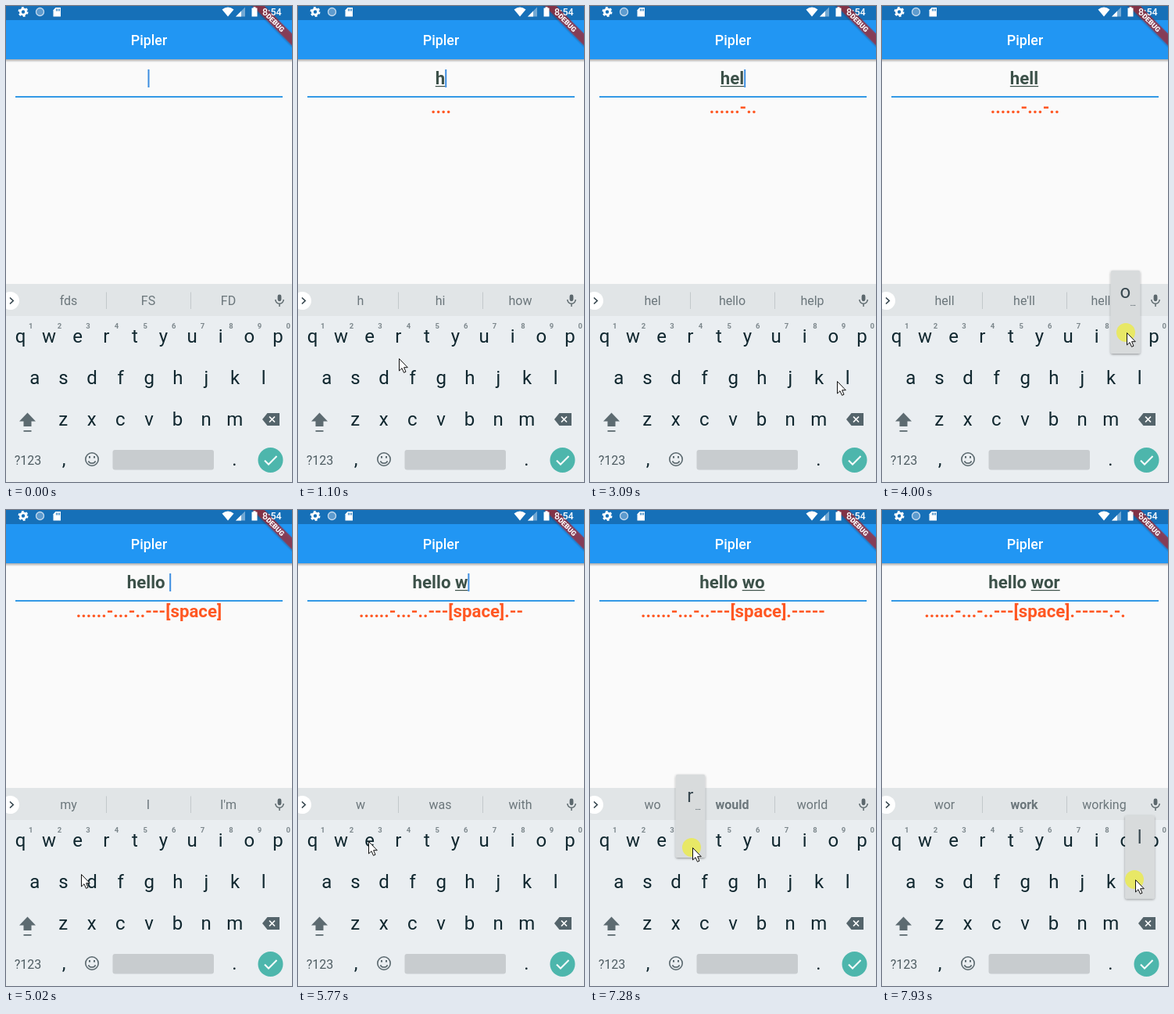
Animation of 366 by 608 pixels, one loop 8 s. Source, as an HTML page:

```html
<!DOCTYPE html>
<html lang="en">
<head>
<meta charset="utf-8">
<title>Pipler</title>
<style>
html, body { margin: 0; width: 100%; height: 100%; overflow: hidden; background: #fafafa; }
svg { display: block; width: 100%; height: 100%; font-family: Roboto, sans-serif; }
text { white-space: pre; }
.mid { text-anchor: middle; }
.big { font-size: 22.26px; font-weight: 700; }
.key { font-size: 24px; fill: #10272f; }
.hint { font-size: 9.5px; font-weight: 700; fill: #7c878c; }
.tip { font-size: 16px; fill: #6b767b; }
</style>
</head>
<body>
<svg viewBox="0 0 366 608">
  <defs>
    <linearGradient id="fade" x2="0" y2="1">
      <stop stop-color="#000" stop-opacity=".32"/><stop offset="1" stop-color="#000" stop-opacity="0"/>
    </linearGradient>
    <filter id="lift" x="-30%" y="-20%" width="160%" height="140%">
      <feDropShadow dx="0" dy="1" stdDeviation="1.5" flood-opacity=".4"/>
    </filter>
  </defs>

  <rect width="366" height="608" fill="#fafafa"/>
  <rect y="68" width="366" height="4" fill="url(#fade)"/>
  <rect y="18" width="366" height="50" fill="#2196f3"/>
  <rect width="366" height="18" fill="#1670b8"/>
  <text class="mid" x="183" y="50" font-size="17.8" font-weight="500" fill="#fff">Pipler</text>

  <g transform="translate(366) rotate(45)">
    <rect x="-60" y="24.9" width="120" height="10.7" fill="#b71c1c" fill-opacity=".63" filter="url(#lift)"/>
    <text class="mid" y="33.4" font-size="9" font-weight="900" fill="#fff">DEBUG</text>
  </g>

  <g fill="#fff">
    <circle cx="22" cy="7.5" r="3.6" fill="none" stroke="#fff" stroke-width="2.8"/>
    <circle cx="22" cy="7.5" r="5.5" fill="none" stroke="#fff" stroke-width="2" stroke-dasharray="2.88"/>
    <circle cx="43.5" cy="7.5" r="5" fill="#8fb8dc" fill-opacity=".6" stroke="#c4daee" stroke-width="1.3"/>
    <path d="M63.5 2H70V13.5H60.500V5.200Z"/>
    <path d="M64.500 3.500v3m2-3v3m2-3v3" stroke="#1670b8"/>
    <path d="M276.500 4.500Q284 -1.500 291.500 4.500L284 13.500Z"/>
    <path d="M306 1.500V13.500H294Z" fill-opacity=".4"/>
    <path d="M301 6.500V13.500H294Z"/>
    <path d="M314.500 2.500H316.500V1.300H319.500V2.500H321.500V13.500H314.500Z"/>
    <text x="328" y="12.300" font-size="12.500" font-weight="500">8:54</text>
  </g>

  <rect x="12" y="115" width="342" height="2" fill="#3399e6"/>
  <text id="typed" class="big" y="100" fill="#3c5149"/>
  <rect id="under" y="102" height="1.2" fill="#3c5149"/>
  <rect id="caret" y="81" width="2" height="23" fill="#3c8de0"/>
  <text id="morse" class="big mid" x="183" y="136.500" fill="#ff5722"/>

  <rect y="355" width="366" height="253" fill="#eaeef1"/>
  <rect y="355" width="366" height="41" fill="#e1e5e7"/>
  <path d="M128.500 365.500V387M236.500 365.500V387" stroke="#c2c8cb"/>
  <circle cx="5.500" cy="376.500" r="11.500" fill="#fff"/>
  <path d="M5 372.500l4.200 4-4.200 4" fill="none" stroke="#37474f" stroke-width="1.700"/>
  <text class="tip mid" x="80" y="382"/>
  <text class="tip mid" x="182" y="382"/>
  <text class="tip mid" x="284.500" y="382"/>
  <g fill="none" stroke="#5c686d" stroke-width="1.500">
    <rect x="347.600" y="368.600" width="4.800" height="8.600" rx="2.400" fill="#5c686d" stroke="none"/>
    <path d="M344.800 375a5.200 5.200 0 0 0 10.400 0M350 380.500V384"/>
  </g>
  <g id="keys"></g>

  <path d="M27.500 519.500L38 530.500H32.500V537H22.500V530.500H17Z" fill="#5d6b71"/>
  <rect x="22.500" y="542" width="10" height="1.800" fill="#5d6b71"/>
  <path d="M334.500 520H350V536H334.500L328 528Z" fill="#54646b"/>
  <path d="M337 524.500l7 7m0-7l-7 7" stroke="#fff" stroke-width="1.700"/>
  <text class="mid" x="28" y="585.500" font-size="16" fill="#4f5d63">?123</text>
  <text class="key mid" x="74" y="587" font-size="22">,</text>
  <text class="key mid" x="292.500" y="587" font-size="22">.</text>
  <g fill="none" stroke="#59676d" stroke-width="1.600">
    <circle cx="110" cy="579" r="8.200"/>
    <path d="M105.500 581.200a4.700 4 0 0 0 9 0"/>
    <path d="M107 575v2.500M113 575v2.500" stroke-width="2"/>
  </g>
  <rect id="space" x="136.500" y="567" width="129.500" height="25.500" rx="3" fill="#c8cccf"/>
  <circle cx="338.500" cy="580" r="16" fill="#4db6ac"/>
  <path d="M331 580.500l5 5 10.500-10.500" fill="none" stroke="#fff" stroke-width="2"/>

  <g id="popup">
    <rect x="-18.500" y="-92" width="37.500" height="106" rx="2" fill="#d8dbdc" filter="url(#lift)"/>
    <text class="key mid" y="-57" style="fill:#37474f"/>
    <text id="more" class="mid" x="10" y="-47" font-size="11" fill="#37474f">…</text>
  </g>
  <g id="pointer">
    <circle id="touch" cx="-1" r="12" fill="#e8e85c" fill-opacity=".93"/>
    <path d="M.5 .5V16L4 12.700L6.500 18.300L9 17.200L6.600 11.700H11.300Z" fill="#fff" stroke="#111" stroke-linejoin="round"/>
  </g>
</svg>

<script>
const LOOP = 8000, BLINK = 500, TIP_DELAY = 90;
const byId = id => document.getElementById(id);
const show = (el, on) => el.setAttribute('visibility', on ? 'visible' : 'hidden');
const code = { h: '....', e: '.', l: '.-..', o: '---', ' ': '[space]', w: '.--', r: '.-.' };

// key, pressed at, released at, suggestions afterwards (* marks bold)
const presses = [
  ['h', 690, 800, 'h|hi|how'],
  ['e', 1420, 1540, 'he|hey|hello'],
  ['l', 2720, 2840, 'hel|hello|help'],
  ['l', 3250, 3370, "hell|he'll|hello"],
  ['o', 3960, 4100, 'hello|hello’s|hellos'],
  [' ', 4650, 4770, "my|I|I'm"],
  ['w', 5430, 5560, 'w|was|with'],
  ['o', 6290, 6410, 'wo|*would|world'],
  ['r', 7280, 7410, 'wor|*work|working'],
  ['l', 7910, 8010, '']
];

// pointer stops: time, x, y
const path = [
  [330, 255, 610], [680, 222, 478], [850, 222, 478], [1100, 129, 450],
  [1330, 94, 424], [1590, 94, 424], [1950, 287, 464], [2300, 310, 489],
  [2410, 314, 496], [2540, 316, 479], [3800, 316, 479], [3950, 313, 417],
  [4130, 313, 417], [4580, 205, 579], [4790, 205, 579], [5020, 96, 465],
  [5350, 57, 424], [5640, 57, 424], [6220, 309, 415], [6280, 308, 415],
  [6520, 308, 415], [7070, 131, 431], [7430, 131, 431], [7780, 318, 480],
  [7890, 324, 472], [8000, 324, 472]
];

const spots = {};
let markup = '';
[['qwertyuiop', 18.5, 430], ['asdfghjkl', 36.8, 482.5], ['zxcvbnm', 73.2, 535.5]].forEach(([row, left, y], r) => {
  [...row].forEach((key, i) => {
    const x = left + 36.6 * i;
    spots[key] = [x, y, r === 0];
    markup += `<text class="key mid" x="${x}" y="${y}">${key}</text>`;
    if (r === 0) markup += `<text class="hint mid" x="${x + 13.3}" y="412">${(i + 1) % 10}</text>`;
  });
});
byId('keys').innerHTML = markup;

const typed = byId('typed'), under = byId('under'), caret = byId('caret'), morse = byId('morse');
const popup = byId('popup'), popupKey = popup.querySelector('.key');
const tips = document.querySelectorAll('.tip');

function drawText(t) {
  const done = presses.filter(p => p[2] <= t);
  const text = done.map(p => p[0]).join('');
  typed.textContent = text;
  morse.textContent = done.map(p => code[p[0]]).join('');
  const width = text ? typed.getComputedTextLength() : 0;
  const left = 182 - width / 2;
  typed.setAttribute('x', left);

  const wordAt = text.lastIndexOf(' ') + 1, letters = text.length - wordAt;
  show(under, letters > 0);
  if (letters) {
    const word = typed.getSubStringLength(wordAt, letters);
    under.setAttribute('x', left + width - word);
    under.setAttribute('width', word);
  }

  const since = t - (done.length ? done[done.length - 1][2] : -170);
  show(caret, since % (2 * BLINK) < BLINK);
  caret.setAttribute('x', left + width - (text ? 0 : 0.5));
}

function drawTips(t) {
  const words = presses.reduce((now, p) => p[2] + TIP_DELAY <= t ? p[3] : now, 'fds|FS|FD').split('|');
  tips.forEach((tip, i) => {
    tip.textContent = words[i].replace('*', '');
    tip.style.fontWeight = words[i][0] === '*' ? 700 : 400;
  });
}

function drawPress(t) {
  const press = presses.find(p => p[1] <= t && t < p[2]);
  const spot = press && spots[press[0]];
  show(popup, spot);
  show(byId('more'), spot && spot[2]);
  if (spot) {
    popup.setAttribute('transform', `translate(${spot[0]} ${spot[1]})`);
    popupKey.textContent = press[0];
  }
  byId('space').setAttribute('fill', press && press[0] === ' ' ? '#b9bec1' : '#c8cccf');
  return press;
}

function drawPointer(t, press) {
  const visible = t >= path[0][0];
  show(byId('pointer'), visible);
  show(byId('touch'), visible && press);
  if (!visible) return;
  const next = path.findIndex(p => p[0] > t);
  const [t0, x0, y0] = path[next - 1], [t1, x1, y1] = path[next];
  const u = (t - t0) / (t1 - t0), k = u * u * (3 - 2 * u);
  const x = Math.round(x0 + (x1 - x0) * k), y = Math.round(y0 + (y1 - y0) * k);
  byId('pointer').setAttribute('transform', `translate(${x} ${y})`);
}

function frame() {
  const t = performance.now() % LOOP;
  drawText(t);
  drawTips(t);
  drawPointer(t, drawPress(t));
  requestAnimationFrame(frame);
}
frame();
</script>
</body>
</html>
```
